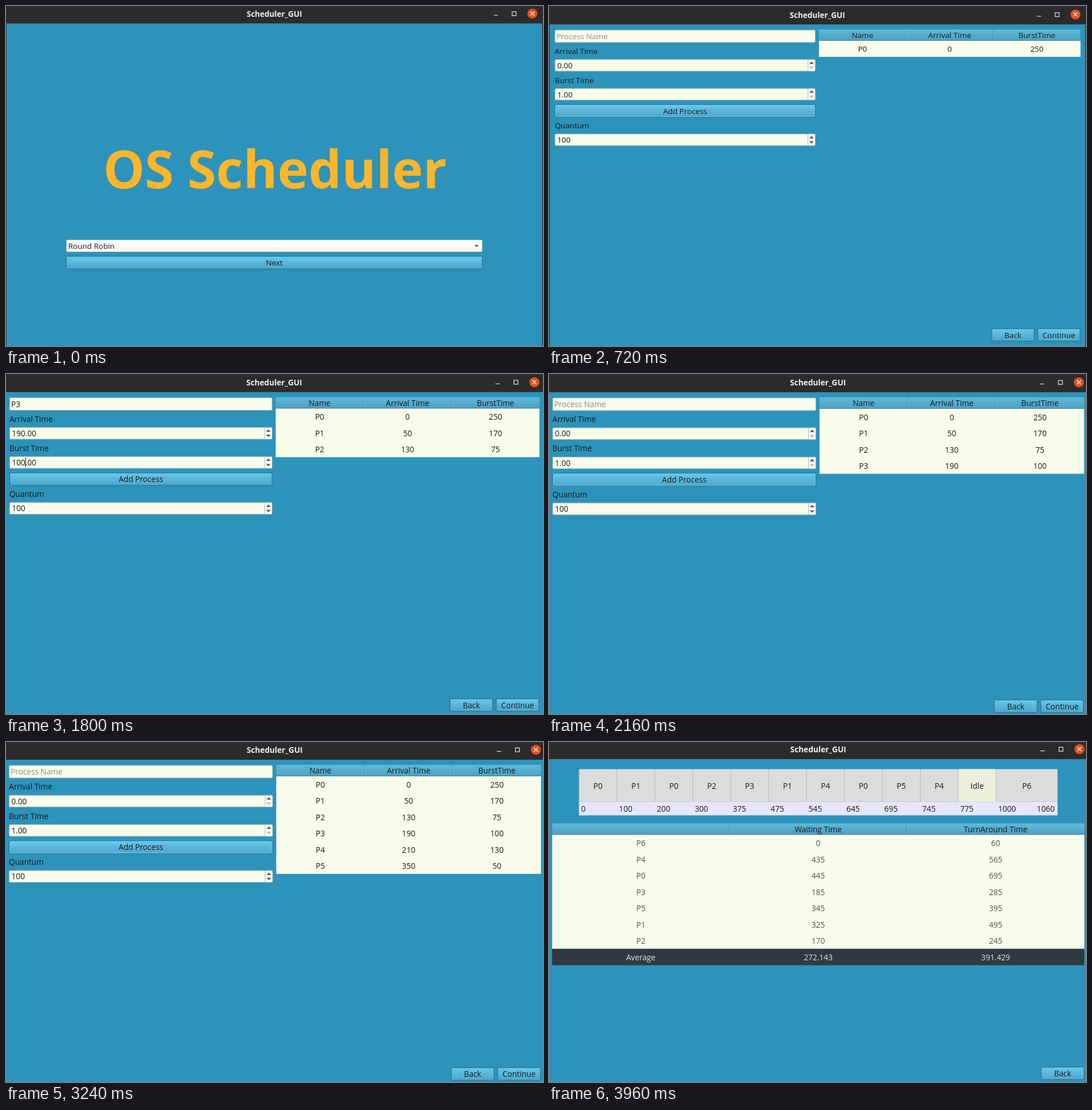
An HTML page with a canvas for the animation above (5050 ms loop, 941x595 px).

```html
<!DOCTYPE html>
<html lang="en">
<head>
<meta charset="utf-8">
<title>Scheduler_GUI</title>
<style>
html, body { margin: 0; width: 100%; height: 100%; overflow: hidden; background: #2d93ba; }
canvas { display: block; }
</style>
</head>
<body>
<canvas id="stage" width="941" height="595"></canvas>
<script>
const ctx = document.getElementById('stage').getContext('2d');
const FAMILY = '"Open Sans", "Noto Sans", sans-serif';
const CREAM = '#f8fcea', INK = '#16191a';
const STEP = 360, LOOP = 5050;

const jobs = [[0, 250], [50, 170], [130, 75], [190, 100], [210, 130], [350, 50], [1000, 60]];
const results = [
  ['P6', 0, 60], ['P4', 435, 565], ['P0', 445, 695], ['P3', 185, 285],
  ['P5', 345, 395], ['P1', 325, 495], ['P2', 170, 245]
];
const gantt = [
  ['P0', 0], ['P1', 100], ['P0', 200], ['P2', 300], ['P3', 375], ['P1', 475],
  ['P4', 545], ['P0', 645], ['P5', 695], ['P4', 745], ['Idle', 775], ['P6', 1000]
];

// scale, x and y of the window, then the view to draw
const scenes = [
  [.987, 4, 2.8, home],
  [.987, 4, 4, () => form(0, 0)],
  [.987, 4.1, 4.6, () => form(1)],
  [.993, 2, 3, () => form(1, 1)],
  [1, 0, 0, () => form(2)],
  [.995, 0, 3.75, () => form(3, 3)],
  [.998, 0, 4, () => form(4)],
  [1.0015, 0, 1.9, () => form(4, 4)],
  [1, 0, 2.5, () => form(5, 5)],
  [.999, -1, 3, () => form(6)],
  [.999, -.5, 2.5, () => form(7)],
  [.999, 0, 2, report]
];

function rect(x, y, w, h, fill) {
  ctx.fillStyle = fill;
  ctx.fillRect(x, y, w, h);
}

function shade(y, h, top, bottom) {
  const g = ctx.createLinearGradient(0, y, 0, y + h);
  g.addColorStop(0, top);
  g.addColorStop(1, bottom);
  return g;
}

function box(x, y, w, h, fill, stroke, radius = 2) {
  ctx.beginPath();
  ctx.roundRect(x, y, w, h, radius);
  ctx.fillStyle = fill;
  ctx.fill();
  ctx.strokeStyle = stroke;
  ctx.lineWidth = 1;
  ctx.stroke();
}

function line(color, width, ...p) {
  ctx.beginPath();
  for (let i = 0; i < p.length; i += 4) {
    ctx.moveTo(p[i], p[i + 1]);
    ctx.lineTo(p[i + 2], p[i + 3]);
  }
  ctx.strokeStyle = color;
  ctx.lineWidth = width;
  ctx.stroke();
}

// y is the middle of the capitals
function text(str, x, y, { align = 'left', color = INK, size = 13.7, weight = 400 } = {}) {
  ctx.font = `${weight} ${size}px ${FAMILY}`;
  ctx.textAlign = align;
  ctx.fillStyle = color;
  ctx.fillText(str, x, y + size * .357);
}

const centred = (str, x, y, color) => text(str, x, y, { align: 'center', color });

function button(label, x, y, w, h, focused) {
  box(x, y, w, h, shade(y, h, '#66c8ec', '#4fa6c8'), '#23698a');
  if (focused) {
    ctx.beginPath();
    ctx.roundRect(x + 1, y + 1, w - 2, h - 2, 1.5);
    ctx.strokeStyle = '#7ccdec';
    ctx.stroke();
  }
  centred(label, x + w / 2, y + h / 2 + .5);
}

function arrow(x, y, dir, color = '#50504c') {
  ctx.beginPath();
  ctx.moveTo(x - 4, y + 2 * dir);
  ctx.lineTo(x + 4, y + 2 * dir);
  ctx.lineTo(x, y - 2 * dir);
  ctx.fillStyle = color;
  ctx.fill();
}

function spin(value, y, atMin, caret) {
  box(6.5, y, 462, 20.5, CREAM, '#a9b9b0');
  rect(456, y + .5, 12, 19.5, '#f6f7f1');
  line('#b4b8ae', 1, 455.5, y, 455.5, y + 20.5);
  arrow(462, y + 5.5, 1);
  arrow(462, y + 14.8, -1, atMin ? '#b9b9b2' : undefined);
  text(value, 10.5, y + 10.5);
  if (caret) {
    const x = Math.round(10.5 + ctx.measureText(value.split('.')[0]).width) + .5;
    line('#000', 1, x, y + 2, x, y + 18.5);
  }
}

function table(x, y, w, heads, rows, color) {
  const col = w / 3;
  rect(x, y, w, 20, shade(y, 20, '#60bad9', '#4f9fc0'));
  line('#2f7796', 1, x, y + 19.5, x + w, y + 19.5);
  rect(x, y + 20, w, rows.length * 28.5, CREAM);
  heads.forEach((head, i) => {
    const cx = x + col * (i + .5);
    if (i) {
      const sx = x + col * i;
      line('#3f89a8', 1, sx, y, sx, y + 19);
      line('#72c3df', 1, sx + 1, y, sx + 1, y + 19);
    }
    centred(head, cx, y + 10.5);
    rows.forEach((row, r) => centred(row[i], cx, y + 35 + r * 28.5, color));
  });
}

function frame() {
  rect(-20, -20, 1000, 640, '#2b2b2b');
  rect(-3, 28, 951, 640, '#2d93ba');
  text('Scheduler_GUI', 472.3, 11.3, { align: 'center', color: '#f2f2ee', weight: 700 });
  line('#e8e8e4', 1.2, 862, 13.5, 869.5, 13.5);
  ctx.strokeRect(894.5, 7.2, 7, 7);
  ctx.beginPath();
  ctx.arc(930.5, 10.5, 8.8, 0, 7);
  ctx.fillStyle = '#e5501e';
  ctx.fill();
  line('#fff', 1.3, 927, 7, 934, 14, 934, 7, 927, 14);
}

function home() {
  text('OS Scheduler', 473.5, 287.3, { align: 'center', color: '#ffb62b', size: 93, weight: 700 });
  box(102.8, 411.5, 739, 22, shade(411, 23, '#ffffff', '#f6f9ec'), '#4f93ad');
  text('Round Robin', 106.4, 423);
  arrow(831.5, 422.8, -1, '#5a5a56');
  button('Next', 102.8, 441, 739, 22.5);
}

// count: rows in the table; typed: index of the job being entered
function form(count, typed) {
  const [arrival, burst] = jobs[typed] ?? [0, 1];
  const idle = typed === undefined;
  box(6.5, 38, 462, 22, CREAM, '#9fb8b4');
  text(idle ? 'Process Name' : 'P' + typed, 9, 49.3, { color: idle ? '#8d8f86' : INK });
  text('Arrival Time', 6, 75.3);
  spin(arrival.toFixed(2), 90.3, !arrival);
  text('Burst Time', 6, 126.8);
  spin(burst.toFixed(2), 141.6, idle, !idle);
  button('Add Process', 6.5, 170.2, 462, 22, idle);
  text('Quantum', 6, 207.3);
  spin('100', 222.3);
  const rows = jobs.slice(0, count).map((job, i) => ['P' + i, ...job]);
  table(475, 37, 464.5, ['Name', 'Arrival Time', 'BurstTime'], rows);
  button('Back', 782, 567.5, 75, 22);
  button('Continue', 863.5, 567.5, 75, 22);
}

function report() {
  rect(52.5, 45.5, 839.5, 57, '#dcdcdc');
  rect(52.5, 102.5, 839.5, 24, '#e6e6fa');
  gantt.forEach(([name, start], i) => {
    const x = 52.7 + i * 66.5;
    const w = i === 11 ? 108 : 66.5;
    if (name === 'Idle') rect(x, 45.5, w, 57, '#eeeedd');
    ctx.setLineDash([1, 1.5]);
    line('#808080', 1, x, 45.5, x, 102.5);
    ctx.setLineDash([]);
    centred(name, x + w / 2, 75.3);
    text(start, x + 3.5, 115.3);
  });
  text('1060', 887, 115.3, { align: 'right' });
  table(5.5, 140.5, 933.5, ['', 'Waiting Time', 'TurnAround Time'], results, '#505350');
  rect(5.5, 360.5, 933.5, 28.5, '#2f3940');
  ['Average', '272.143', '391.429'].forEach((s, i) => centred(s, 161 + i * 311.2, 375.5, '#e2e5e4'));
  button('Back', 863.5, 567.5, 75, 22);
}

function draw() {
  const t = performance.now() % LOOP;
  const [scale, x, y, view] = scenes[Math.min(Math.floor(t / STEP), scenes.length - 1)];
  ctx.setTransform(scale, 0, 0, scale, x, y);
  frame();
  view();
  requestAnimationFrame(draw);
}
draw();
</script>
</body>
</html>
```
